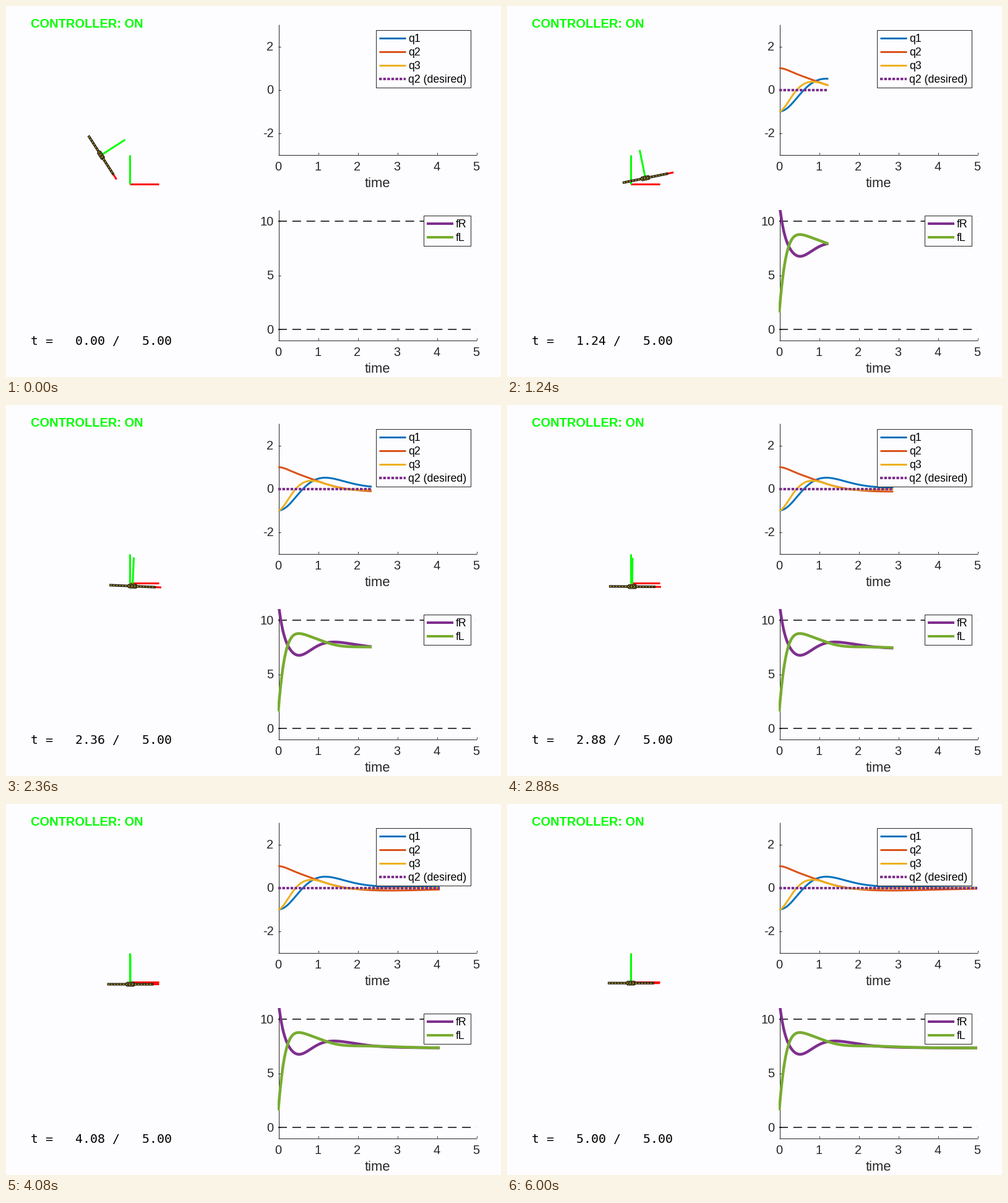
A matplotlib script for the animation above (6040 ms loop, 800 by 600 pixels).

```python
import numpy as np
import matplotlib.pyplot as plt
from matplotlib.animation import FuncAnimation
from matplotlib.patches import Rectangle, Polygon

W, H, DPI = 800, 600, 100
PT = 72 / DPI                      # points per pixel
BG, INK = "#fdfcfe", "#262626"
BLUE, ORANGE, GOLD = "#0072bd", "#d95319", "#edb120"
PURPLE, OLIVE = "#7e2f8e", "#77ac30"
DOTS = (0, (1.1, 0.55))
T_END, STEP, SUB = 5.0, 0.04, 8    # seconds, seconds per frame, substeps
FRAMES = 151


# ---- planar drone under LQR control ----
MASS, GRAV, ARM = 1.5, 9.81, 3.0   # ARM is lever length over inertia


def lqr_gain():
    a, b = np.zeros((6, 6)), np.zeros((6, 2))
    a[:3, 3:] = np.eye(3)
    a[3, 2] = -GRAV
    b[4] = 1 / MASS
    b[5] = ARM, -ARM
    ham = np.block([[a, -b @ b.T], [-np.eye(6), -a.T]])
    val, vec = np.linalg.eig(ham)
    stable = vec[:, val.real < 0]
    return b.T @ np.real(stable[6:] @ np.linalg.inv(stable[:6]))


GAIN = lqr_gain()


def thrust(s):
    return MASS * GRAV / 2 - GAIN @ s


def deriv(s):
    right, left = thrust(s)
    lift = (right + left) / MASS
    acc = [-lift * np.sin(s[2]), lift * np.cos(s[2]) - GRAV, ARM * (right - left)]
    return np.concatenate([s[3:], acc])


def simulate():
    dt = STEP / SUB
    states = [np.array([-1.0, 1.0, -1.0, 0, 0, 0])]
    for _ in range(round(T_END / dt)):
        s = states[-1]
        k1 = deriv(s)
        k2 = deriv(s + dt / 2 * k1)
        k3 = deriv(s + dt / 2 * k2)
        k4 = deriv(s + dt * k3)
        states.append(s + dt / 6 * (k1 + 2 * k2 + 2 * k3 + k4))
    return np.array(states)


STATES = simulate()
FORCES = np.array([thrust(s) for s in STATES])
TIMES = np.linspace(0, T_END, len(STATES))

# ---- stage in pixel coordinates ----
fig = plt.figure(figsize=(W / DPI, H / DPI), dpi=DPI, facecolor=BG)
ax = fig.add_axes([0, 0, 1, 1])
ax.set_xlim(0, W)
ax.set_ylim(H, 0)
ax.axis("off")


def line(x, y, color, width, z=2, **kw):
    kw.setdefault("solid_capstyle", "butt")
    kw.setdefault("dash_capstyle", "butt")
    return ax.plot(x, y, color=color, lw=width * PT, zorder=z, **kw)[0]


def text(x, y, s, size, color=INK, ha="left", z=6, **kw):
    kw.setdefault("family", "Liberation Sans")
    return ax.text(x, y, s, fontsize=size * PT, color=color, ha=ha,
                   va="baseline", zorder=z, **kw)


class Plot:
    """Left and bottom axis lines with inward ticks."""

    def __init__(self, top, low, high, ticks):
        self.top, self.low, self.high = top, low, high
        base = top + 210
        line([440.5, 440.5], [top, base + 1], INK, 1)
        line([440, 760.5], [base + 0.5] * 2, INK, 1)
        for k in range(6):
            x = self.x(k) + 0.5
            line([x, x], [base, base - 3.2], INK, 1)
            text(self.x(k), base + 26.5, str(k), 20, ha="center")
        for v in ticks:
            y = self.y(v)
            line([440, 444], [y, y], INK, 1)
            text(432.5, y + 7, str(v), 20, ha="right")
        text(600, base + 53, "time", 22, ha="center")
        self.clip = Rectangle((439, top), 322, 211, transform=ax.transData)

    def x(self, t):
        return 440 + 64 * t

    def y(self, v):
        return self.top + 0.5 + 210 * (self.high - v) / (self.high - self.low)

    def curve(self, color, width, **kw):
        art = line([], [], color, width, z=3, **kw)
        art.set_clip_path(self.clip)
        return art


def legend(x, y, w, h, rows, width):
    ax.add_patch(Rectangle((x, y), w, h, fc=BG, ec=INK, lw=PT, zorder=5))
    for cy, label, color, style in rows:
        lw = 4 if style != "-" else width
        line([x + 5.5, x + 48.5], [cy, cy], color, lw, z=6, linestyle=style)
        text(x + 52.5, cy + 6.3, label, 17.6, "black")


pose_plot = Plot(30, -3, 3, [-2, 0, 2])
force_plot = Plot(330, -1, 11, [0, 5, 10])
for limit in (0, 10):
    y = force_plot.y(limit)
    line([440, 760], [y, y], "black", 1.5, linestyle=(0, (14 / 1.5, 8.85 / 1.5)))

legend(597.5, 38.5, 153.5, 93.5, [
    (51.5, "q1", BLUE, "-"), (73.5, "q2", ORANGE, "-"),
    (96, "q3", GOLD, "-"), (118, "q2 (desired)", PURPLE, DOTS)], 3)
legend(674.5, 338.5, 76.5, 49, [
    (351.5, "fR", PURPLE, "-"), (373.5, "fL", OLIVE, "-")], 4)

traces = [
    (pose_plot, pose_plot.curve(BLUE, 3), STATES[:, 0]),
    (pose_plot, pose_plot.curve(ORANGE, 3), STATES[:, 1]),
    (pose_plot, pose_plot.curve(GOLD, 3), STATES[:, 2]),
    (pose_plot, pose_plot.curve(PURPLE, 4, linestyle=DOTS), 0 * TIMES),
    (force_plot, force_plot.curve(PURPLE, 4.5), FORCES[:, 0]),
    (force_plot, force_plot.curve(OLIVE, 4.5), FORCES[:, 1]),
]

text(40, 35, "CONTROLLER: ON", 20, "#00ff00", weight="bold")
clock = text(40, 548, "", 20, "black", family="DejaVu Sans Mono")

# ---- drone view ----
OX, OY, UNIT = 200, 287.8, 46.5
RED, GREEN, SHELL, MESH = "#ff0000", "#00ff00", "#1c180c", "#cdb83c"
line([OX, OX + UNIT], [OY, OY], RED, 3, z=2)
line([OX, OX], [OY, OY - UNIT], GREEN, 3, z=2)

MESH_DASH = (0, (2.4, 1.3))
segments = [  # local ends in pixels, y up
    (line([], [], RED, 3, z=3), (0, 0), (UNIT, 0)),
    (line([], [], GREEN, 3, z=3), (0, 0), (0, UNIT)),
    (line([], [], SHELL, 4, z=4), (-37.5, 0), (37.5, 0)),
    (line([], [], MESH, 1.3, z=5, linestyle=MESH_DASH), (-36.5, 0), (36.5, 0)),
    (line([], [], MESH, 0.9, z=5, linestyle=MESH_DASH), (-5.5, 2.2), (5.5, 2.2)),
    (line([], [], MESH, 0.9, z=5, linestyle=MESH_DASH), (-5.5, -2.2), (5.5, -2.2)),
]
HUB = np.array([(-7.5, -2), (-6, -3.8), (6, -3.8), (7.5, -2),
                (7.5, 2), (6, 3.8), (-6, 3.8), (-7.5, 2)])
hub = ax.add_patch(Polygon(HUB, fc=SHELL, ec="none", zorder=4))


def to_stage(points, q):
    c, s = np.cos(q[2]), np.sin(q[2])
    p = np.asarray(points) @ np.array([[c, s], [-s, c]]) + UNIT * q[:2]
    return np.column_stack([OX + p[:, 0], OY - p[:, 1]])


def draw(n):
    i = min(n * SUB, len(TIMES) - 1)
    for plot, art, values in traces:
        art.set_data(plot.x(TIMES[:i + 1]), plot.y(values[:i + 1]))
    q = STATES[i, :3]
    for art, *ends in segments:
        art.set_data(*to_stage(ends, q).T)
    hub.set_xy(to_stage(HUB, q))
    clock.set_text(f"t = {TIMES[i]:6.2f} / {T_END:6.2f}")
    return []


anim = FuncAnimation(fig, draw, frames=FRAMES, interval=1000 * STEP,
                     repeat=True, repeat_delay=0, blit=False)
plt.show()
```
